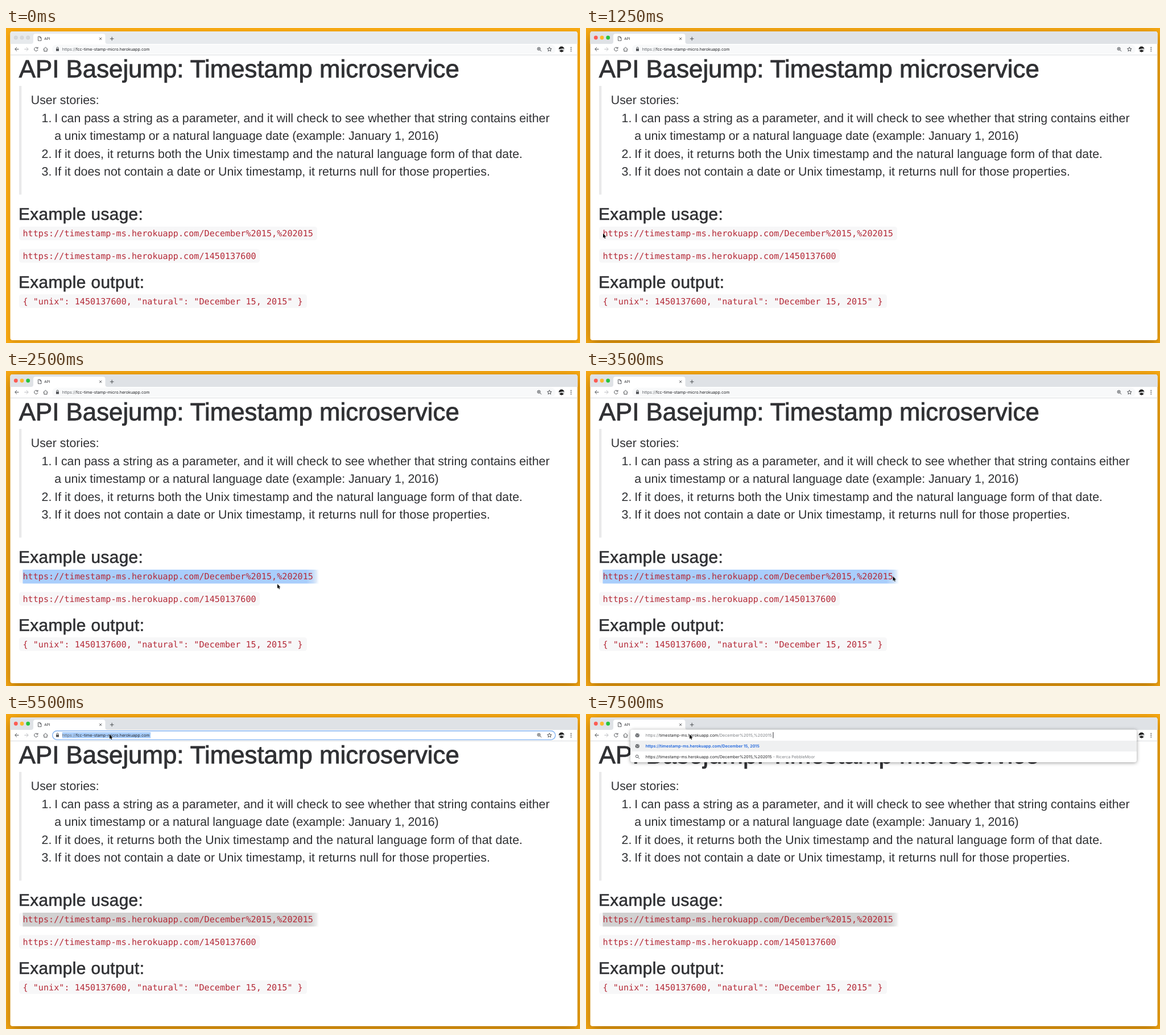
These frames come from a looping animation (1009 by 555 pixels, 8000 ms). An HTML page:

```html
<!DOCTYPE html>
<html lang="en">
<head>
<meta charset="utf-8">
<title>API</title>
<style>
  html, body { margin: 0; width: 100%; height: 100%; overflow: hidden; background: #f8a912; }
  svg { display: block; width: 1009px; height: 555px; }
  text { font-family: "Liberation Sans", Arial, sans-serif; fill: #303134; text-rendering: geometricPrecision; white-space: pre; }

  .head { stroke: #303134; stroke-width: .02em; }
  h1, .h1 { font-size: 43.8px; }
  .h3 { font-size: 29.8px; letter-spacing: .4px; }
  .body text { font-size: 21.4px; }
  .code text { font: 15.15px "DejaVu Sans Mono", monospace; fill: #b52a38; }
  .code rect { fill: #f7f7f8; }
  .ui text { font: 7.15px Inter, sans-serif; fill: #202124; }
  .ui .dim { fill: #7b7e82; }
  .ui .hit { fill: #1a62dc; font-weight: 600; }
  .icon { fill: none; stroke: #4c4f53; stroke-width: 1; }
  .off { stroke: #b9bbbe; }

  /* every change is a hard cut on a 250 ms grid */
  .step { animation: 8s step-end infinite; }
  #frame { animation-name: shadow; }
  #active { animation-name: activate; }
  #sel { animation-name: drag, fade; }
  #focus { animation-name: focus; }
  #popup { animation-name: popup; }
  #caret { animation-name: blink; }
  #pointer { animation-name: move; }

  @keyframes shadow {
    0% { filter: drop-shadow(0 3px 5px rgba(90, 50, 0, .22)); }
    15.625%, 100% { filter: drop-shadow(0 6px 10px rgba(80, 45, 0, .45)); }
  }
  @keyframes activate { 0% { opacity: 0; } 15.625%, 100% { opacity: 1; } }
  /* one unit of scale is one selected character */
  @keyframes drag {
    0% { transform: scaleX(0); }
    25% { transform: scaleX(25); }
    28.125% { transform: scaleX(43); }
    31.25% { transform: scaleX(56); }
    34.375% { transform: scaleX(51); }
    37.5% { transform: scaleX(54); }
    40.625%, 100% { transform: scaleX(56); }
  }
  @keyframes fade { 0% { fill: #a9cefc; } 68.75%, 100% { fill: #d1d1d1; } }
  @keyframes focus { 0% { opacity: 0; } 68.75%, 100% { opacity: 1; } }
  @keyframes popup { 0% { opacity: 0; } 81.25%, 100% { opacity: 1; } }
  @keyframes blink { 0% { opacity: 1; } 87.5% { opacity: 0; } 93.75%, 100% { opacity: 1; } }
  @keyframes move {
    0% { transform: translate(-20px, 413px); }
    3.125% { transform: translate(21px, 413px); }
    6.25% { transform: translate(34.5px, 386px); }
    9.375% { transform: translate(38px, 367px); }
    12.5% { transform: translate(30px, 362px); }
    18.75% { transform: translate(29.6px, 361.6px); }
    25% { transform: translate(259px, 367px); }
    28.125% { transform: translate(423px, 369px); }
    31.25% { transform: translate(477px, 375.3px); }
    34.375% { transform: translate(496px, 371px); }
    37.5% { transform: translate(522px, 367px); }
    40.625% { transform: translate(537px, 365px); }
    43.75% { transform: translate(539.5px, 361.8px); }
    53.125% { transform: translate(528px, 360.5px); }
    56.25% { transform: translate(256px, 140px); }
    59.375% { transform: translate(-20px, 140px); }
    62.5% { transform: translate(182px, 22px); }
    65.625%, 100% { transform: translate(182px, 36px); }
  }
</style>
</head>
<body>
<svg viewBox="0 0 1009 555">
  <defs>
    <clipPath id="face"><circle cx="976.5" cy="37.5" r="5"/></clipPath>
    <g id="globe">
      <circle r="3.6" fill="#5a5d61"/>
      <path d="M-2.6-1.2Q-.6-.9-.4.4T-1.4 2.6M.2-2.8Q1.2-1.4 2.8-.8M1 .8L2.4 1.2" fill="none" stroke="#fff" stroke-width=".8"/>
    </g>
  </defs>

  <rect id="frame" class="step" x="7.5" y="6" width="997" height="544" rx="4" fill="#fff"/>

  <!-- tab strip -->
  <path id="strip" d="M7.5 28V10a4 4 0 0 1 4-4H1000.500a4 4 0 0 1 4 4V28Z" fill="#e7eaed"/>
  <g fill="#d5d8db" stroke="#c8cbce" stroke-width=".5">
    <circle cx="17.300" cy="17" r="3.200"/><circle cx="28" cy="17" r="3.200"/><circle cx="38.700" cy="17" r="3.200"/>
  </g>
  <g id="active" class="step">
    <path d="M7.5 28V10a4 4 0 0 1 4-4H1000.500a4 4 0 0 1 4 4V28Z" fill="#dfe2e6"/>
    <circle cx="17.300" cy="17" r="3.400" fill="#fc5b53"/>
    <circle cx="28" cy="17" r="3.400" fill="#fcb92b"/>
    <circle cx="38.700" cy="17" r="3.400" fill="#27c43c"/>
  </g>
  <path d="M44 28q4 0 4-4V14q0-4 4-4H170.500q4 0 4 4V24q0 4 4 4Z" fill="#fff"/>

  <g class="ui">
    <g class="icon">
      <path d="M56.500 15h3.300l2.200 2.200V22.300H56.500ZM59.600 15v2.400H62" stroke-width=".9"/>
      <path d="M164.200 16.800l4 4m0-4l-4 4M186.200 15.600v6.600M182.900 18.900h6.600"/>
      <path d="M22.500 37.300H16M19 34l-3.300 3.300L19 40.600"/>
      <path class="off" d="M32.300 37.300h6.500M35.800 34l3.300 3.300-3.300 3.300"/>
      <path d="M55.300 35.200A3.200 3.200 0 1 0 56 38.200M56 33.600v2.400h-2.500"/>
      <path d="M65.500 37.700l4-3.700 4 3.700M66.900 37v4h5.200v-4"/>
    </g>
    <text x="67.300" y="20.700" style="font-size:6.300px">API</text>

    <!-- address bar -->
    <rect x="81" y="29.500" width="885" height="16" rx="8" fill="#f8f9fa"/>
    <g id="focus" class="step">
      <rect x="81.700" y="29.800" width="884" height="15.600" rx="7.800" fill="#fff" stroke="#82b3f2" stroke-width="1.400"/>
      <rect x="98.800" y="32" width="155.500" height="10.500" fill="#a9cefc"/>
    </g>
    <path d="M88 36.500h5V40.500H88Z" fill="#4c4f53"/>
    <path class="icon" d="M89 36.500v-1.300a1.500 1.500 0 0 1 3 0v1.300"/>
    <text x="98.800" y="39.800"><tspan fill="#5f6368">https://</tspan>fcc-time-stamp-micro.herokuapp.com</text>
    <g class="icon" stroke-width=".9">
      <circle cx="936.700" cy="36.700" r="2.600"/>
      <path d="M938.700 38.700l2.500 2.500M935.400 36.700h2.600M936.700 35.400v2.600"/>
      <path d="M955.300 33.700l1.100 2.500 2.700.2-2.100 1.800.7 2.700-2.400-1.500-2.400 1.500.7-2.700-2.100-1.800 2.700-.2Z"/>
    </g>
    <g clip-path="url(#face)">
      <rect x="971" y="32" width="11" height="11" fill="#c9cbcc"/>
      <path d="M971 32H982V36.500Q979 35.400 976 36.400T971 37ZM973 43q0-4.500 3.500-4.500T980.500 43Z" fill="#222"/>
    </g>
    <g fill="#4c4f53">
      <circle cx="993.300" cy="34.400" r=".9"/><circle cx="993.300" cy="37.500" r=".9"/><circle cx="993.300" cy="40.600" r=".9"/>
    </g>
  </g>
  <path d="M8 47.500H1004.500" stroke="#dadcdf"/>

  <!-- page -->
  <text class="head h1" x="22.800" y="87.300">API Basejump: Timestamp microservice</text>
  <rect x="23" y="102" width="4.300" height="191.500" fill="#e9e9ea"/>
  <g class="body">
    <text x="43.700" y="134">User stories:</text>
    <text x="62.600" y="165.600">1.</text>
    <text x="85.200" y="165.600" letter-spacing="-.05">I can pass a string as a parameter, and it will check to see whether that string contains either</text>
    <text x="85.200" y="197.200" letter-spacing="-.12">a unix timestamp or a natural language date (example: January 1, 2016)</text>
    <text x="62.600" y="228.800">2.</text>
    <text x="85.200" y="228.800">If it does, it returns both the Unix timestamp and the natural language form of that date.</text>
    <text x="62.600" y="260.400">3.</text>
    <text x="85.200" y="260.400">If it does not contain a date or Unix timestamp, it returns null for those properties.</text>
  </g>

  <text class="head h3" x="22" y="338.200">Example usage:</text>
  <text class="head h3" x="22" y="457.700">Example output:</text>
  <g class="code">
    <rect x="23" y="350" width="524" height="24" rx="4.500"/>
    <rect x="23" y="389.500" width="423" height="24" rx="4.500"/>
    <rect x="23" y="469.300" width="506" height="24" rx="4.500"/>
    <g transform="translate(29.500 350)"><path id="sel" class="step" d="M0 0H9.125V24.500H0Z"/></g>
    <text x="29.500" y="367.300">https://timestamp-ms.herokuapp.com/December%2015,%202015</text>
    <text x="29.500" y="406.700">https://timestamp-ms.herokuapp.com/1450137600</text>
    <text x="29.500" y="486.500">{ "unix": 1450137600, "natural": "December 15, 2015" }</text>
  </g>

  <!-- suggestions -->
  <g id="popup" class="ui step">
    <rect x="78" y="27.500" width="890" height="57.500" rx="4" fill="#fff" style="filter:drop-shadow(0 1.500px 3px rgba(0,0,0,.4))"/>
    <rect x="78" y="47" width="890" height="19" fill="#eff0f1"/>
    <use href="#globe" x="90.300" y="37.500"/>
    <use href="#globe" x="90.300" y="56.500"/>
    <g class="icon"><circle cx="89.700" cy="74.600" r="2.300"/><path d="M91.400 76.300l2.500 2.500"/></g>
    <text x="104.700" y="39.800"><tspan class="dim">https://</tspan>timestamp-ms.herokuapp.com<tspan class="dim">/December%2015,%202015</tspan></text>
    <path id="caret" class="step" d="M328.500 32h1v10.500h-1Z" fill="#303134"/>
    <text class="hit" x="104.700" y="59">https://timestamp-ms.herokuapp.com/December 15, 2015</text>
    <text x="104.700" y="78">https://timestamp-ms.herokuapp.com/December%2015,%202015<tspan class="dim"> - Ricerca PebbleMoor</tspan></text>
  </g>

  <g id="pointer" class="step">
    <path d="M0 0V7.800L1.800 6.200 3 9 4.300 8.400 3.100 5.700H5.500Z" fill="#000" stroke="#fff" stroke-width=".7" paint-order="stroke"/>
  </g>
</svg>
</body>
</html>
```
